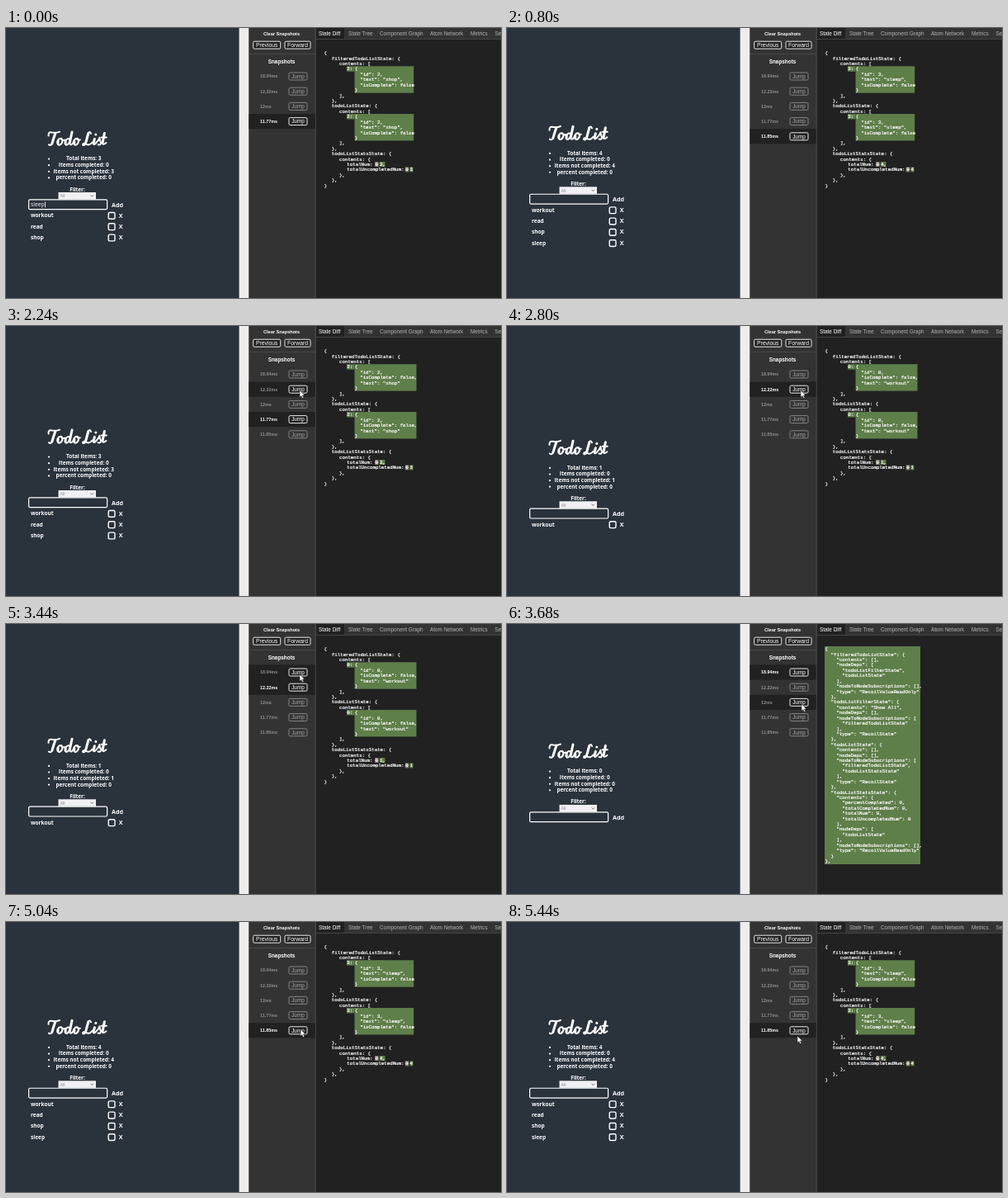
An HTML page that plays this animation: 600x327 px, repeating every 5.52 s.

```html
<!DOCTYPE html>
<html lang="en">
<head>
<meta charset="utf-8">
<title>Todo list with state snapshots</title>
<style>
html, body { margin: 0; width: 100%; height: 100%; overflow: hidden; background: #2a323b; }
svg { display: block; width: 600px; height: 327px; }
text { white-space: pre; }
.ui { font-family: "Liberation Sans", Arial, sans-serif; }
.app { font-family: "Open Sans", "Noto Sans", sans-serif; font-weight: 700; }
.code { font-family: "Liberation Mono", "Courier New", monospace; stroke: #fff; stroke-width: .22; }
.bold { font-weight: 700; }
.plain { font-weight: 500; }
.mid { text-anchor: middle; }
.script { fill: none; stroke: #fff; stroke-width: 2; stroke-linecap: round; stroke-linejoin: round; }
.stem { stroke-width: 3; }
</style>
</head>
<body>
<svg viewBox="0 0 600 327">
  <rect width="600" height="327" fill="#2a323b"/>
  <g id="app"></g>
  <rect x="282.6" width="12" height="327" fill="#efecec"/>
  <rect x="294.4" width="81" height="327" fill="#333"/>
  <rect x="375" width="225" height="327" fill="#212121"/>
  <g id="head"></g>
  <g id="side"></g>
  <g id="diff"></g>
  <path id="mouse" d="M0 0V8.2L1.9 6.5 3.2 9.4 4.7 8.7 3.4 5.9H6Z" fill="#fff" stroke="#222" stroke-width=".5"/>
</svg>
<script>
const LOOP = 5520, TICK = 80;
const GREEN = '#5f7f4a', DARK = '#212121';
const todos = ['workout', 'read', 'shop', 'sleep'];
const times = ['18.94ms', '12.22ms', '12ms', '11.77ms', '11.85ms'];
const el = id => document.getElementById(id);

// [start, item count, typed text]; the active snapshot equals the item count
const states = [
  [0, 3, 'sleep'], [720, 4], [1840, 3], [2400, 1],
  [3520, 0], [4080, 2], [4240, 3], [4960, 4]
];

// [time, x, y] of the pointer tip
const path = [
  [960, 300, 190], [1200, 391, 134], [1360, 391, 134], [1600, 357, 114],
  [1920, 357, 114], [2160, 356, 78], [2960, 356, 78], [3200, 356, 61],
  [3520, 356, 61], [3660, 357, 97], [4080, 357, 97], [4180, 357, 114],
  [4240, 357, 115], [4320, 357, 122], [4480, 357, 130], [5040, 357, 130],
  [5200, 352, 138], [LOOP, 352, 138]
];

// y is the middle of the line
const text = (x, y, s, cls, size, fill = '#fff') =>
  `<text x="${x}" y="${y + size * .35}" class="${cls}" font-size="${size}" fill="${fill}">${s}</text>`;
const rect = (x, y, w, h, fill) =>
  `<rect x="${x}" y="${y}" width="${w}" height="${h}" fill="${fill}"/>`;
const frame = (x, y, w, h, width, stroke = '#fff', fill = 'none') =>
  `<rect x="${x}" y="${y}" width="${w}" height="${h}" rx="1.5" fill="${fill}" stroke="${stroke}" stroke-width="${width}"/>`;

const button = (x, y, w, label, size, lit = true) =>
  frame(x, y, w, 9, .9, lit ? '#fff' : '#8e8e8e', lit ? DARK : 'none') +
  text(x + w / 2, y + 4.6, label, 'ui mid', size, lit ? '#fff' : '#a6a6a6');

const title = `<g class="script" role="img" aria-label="Todo List">
  <path d="M51.5 130.5Q51 126 55 126.4Q60 127.6 65 125.6M55.8 140Q54.5 143 51.8 141.2"/>
  <path d="M66.5 133.8Q63 133.8 62.4 138.5Q62.4 142 65.2 141.6Q68.2 140.5 68.4 136.5Q68 134 66.5 133.8Q68 137 71.5 135.6"/>
  <path d="M77.6 135Q75 132.6 72.6 136.2Q70.8 140.2 73 141.7Q75.6 141.8 77.2 137M77.2 138.5Q77 142 79.6 141Q81 140 82 137.5"/>
  <path d="M86 133.8Q82.8 133.8 82 138.5Q82 142 84.8 141.6Q87.8 140.5 88 136.5Q87.6 134 86 133.8Q87 136.6 89.8 135.4"/>
  <path d="M103 128Q101.6 124.4 99.8 127.5L96.8 138.5Q95.8 143 93.2 141.8Q92.6 139.2 96.3 140Q101 143.4 104.4 138.5"/>
  <path d="M105.9 139.6Q106 142.8 109.4 139Q112.6 136 113.4 132.8Q113.6 136 115 138.6Q115.2 142.2 111.6 141.2"/>
  <path d="M117 138.8Q117 142.8 121.4 139M115.6 132.4H121.8"/>
  <path class="stem" d="M59.8 127.5Q57.5 134 55.8 140M63 137L62.9 139.5M72.2 137.5L72 140M80 126L77.3 138.5M82.8 137L82.7 139.5M99.8 127.5L96.8 138.5M107.4 134.4L106 139.6M108.8 129v.1M119.4 127.4L117.1 138.8"/>
</g>`;

function drawApp(count, typed, caret) {
  const stats = [`Total items: ${count}`, 'Items completed: 0', `Items not completed: ${count}`, 'percent completed: 0'];
  let s = title;
  stats.forEach((label, i) => {
    const y = 158.2 + i * 7.6;
    s += `<circle cx="52" cy="${y + .4}" r="1.1" fill="#fff"/>` + text(94.2, y, label, 'app mid', 6.4);
  });
  s += text(86.5, 195.3, 'Filter:', 'app mid', 6.4);
  s += rect(63.5, 199, 45.5, 8.5, '#f1f1f5') + text(65.5, 203.4, 'All', 'ui', 5.4, '#8d9096');
  s += '<path d="M102.6 202.4l1.7 1.8 1.7-1.8" fill="none" stroke="#555" stroke-width=".8"/>';
  s += frame(27.6, 207.9, 95, 11.8, 1.2);
  if (typed) s += text(30, 213.9, typed, 'app plain', 6.7);
  if (caret) s += rect(47.2, 210.4, .8, 7, '#fff');
  s += text(128, 214.1, 'Add', 'app', 7.2);
  todos.slice(0, count).forEach((todo, i) => {
    const y = 227 + i * 13.3;
    s += text(30, y, todo, 'app', 6.5) + frame(124.2, y - 3.5, 7.8, 7.8, 1.4) + text(136.8, y, 'X', 'app', 7.2);
  });
  el('app').innerHTML = s;
  el('app').setAttribute('transform', `translate(0 ${(3 - count) * 6.65})`);
}

function drawHead() {
  const tabs = [[415, 'State Tree'], [453, 'Component Graph'], [514, 'Atom Network'], [563, 'Metrics'], [592.5, 'Settings']];
  let s = rect(375, 0, 225, 13, '#333') + rect(375, 13, 225, 1, '#444') + rect(376, 0, 34, 13, DARK);
  s += text(379, 6.6, 'State Diff', 'ui', 6.4);
  for (const [x, label] of tabs) s += text(x, 6.6, label, 'ui', 6.4, '#b4b4b4');
  s += text(334, 7, 'Clear Snapshots', 'ui bold mid', 5.6);
  s += button(299.7, 16.2, 33, 'Previous', 6.8) + button(338, 16.2, 31, 'Forward', 6.8);
  s += rect(295, 31, 80, 1, '#484848') + rect(374.6, 0, 1, 327, '#505050');
  s += text(334, 41.2, 'Snapshots', 'ui bold mid', 6.4);
  el('head').innerHTML = s;
}

function drawSide(shown, active, hover) {
  el('side').innerHTML = times.slice(0, shown).map((time, i) => {
    const y = 58.5 + i * 18.2, on = i === active, lit = on || i === hover;
    return (lit ? rect(294.4, y - 9.1, 80.2, 18.2, DARK) : '') +
      text(308, y, time, 'ui bold', 5.4, on ? '#fff' : '#8f8f8f') +
      button(343, y - 4.5, 22, 'Jump', 6.4, lit);
  }).join('');
}

const rowY = i => 30.2 + i * 6.42;
const code = (x, row, s) => text(x, rowY(row), s, 'code', 5.77);

// Initial tree, one nesting level per two spaces
function drawTree() {
  const list = (key, names) => names.length
    ? [`    "${key}": [`, ...names.map((n, i) => `      "${n}"${i < names.length - 1 ? ',' : ''}`), '    ],']
    : [`    "${key}": [],`];
  const node = (name, contents, deps, subs, type) => [
    `  "${name}": {`, ...contents, ...list('nodeDeps', deps),
    ...list('nodeToNodeSubscriptions', subs), `    "type": "${type}"`
  ];
  const empty = ['    "contents": [],'];
  const totals = ['percentCompleted', 'totalCompletedNum', 'totalNum', 'totalUncompletedNum']
    .map((k, i) => `      "${k}": 0${i < 3 ? ',' : ''}`);
  const rows = ['{',
    ...node('filteredTodoListState', empty, ['todoListFilterState', 'todoListState'], [], 'RecoilValueReadOnly'), '  },',
    ...node('todoListFilterState', ['    "contents": "Show All",'], [], ['filteredTodoListState'], 'RecoilState'), '  },',
    ...node('todoListState', empty, [], ['filteredTodoListState', 'todoListStatsState'], 'RecoilState'), '  },',
    ...node('todoListStatsState', ['    "contents": {', ...totals, '    },'], ['todoListState'], [], 'RecoilValueReadOnly'),
    '  }', '},'];
  return rect(385, 27, 116, 264, GREEN) + rows.map((row, i) => code(385.6, i, row)).join('');
}

function drawChange(count, textFirst) {
  const id = count - 1, name = todos[id];
  const fields = textFirst
    ? [`"id": ${id},`, `"text": "${name}",`, '"isComplete": false']
    : [`"id": ${id},`, '"isComplete": false,', `"text": "${name}"`];
  const x = [385.5, 394.8, 404, 413.3, 422.8, 429.2];
  const list = (row, key) => {
    const y = rowY(row + 2) - 3.2;
    return code(x[1], row, key + ': {') + code(x[2], row + 1, 'contents: [') +
      rect(413, y, 9.5, 6.4, GREEN) + rect(422.5, y, textFirst ? 71.7 : 75, 32.4, GREEN) +
      code(x[3], row + 2, id + ':') + code(x[4], row + 2, '{') +
      fields.map((f, i) => code(x[5], row + 3 + i, f)).join('') +
      code(x[4], row + 6, '}') + code(x[2], row + 7, '],') + code(x[1], row + 8, '},');
  };
  const total = (row, key, left, end) => {
    const y = rowY(row) - 3;
    return code(x[3], row, key + ':') +
      rect(left, y, 4.4, 6, '#857c6e') + code(left + .4, row, '0') + rect(left, y + 2.8, 4.4, .6, '#ddd') +
      rect(left + 5.6, y, 4 + end.length * 2.6, 6, GREEN) + code(left + 5.8, row, count + end);
  };
  return code(x[0], 0, '{') + list(1, 'filteredTodoListState') + list(10, 'todoListState') +
    code(x[1], 19, 'todoListStatsState: {') + code(x[2], 20, 'contents: {') +
    total(21, 'totalNum', 447.2, ',') + total(22, 'totalUncompletedNum', 483.8, '') +
    code(x[2], 23, '},') + code(x[1], 24, '},') + code(x[0], 25, '}');
}

function pointer(t) {
  const i = path.findIndex(p => p[0] > t);
  if (i < 1) return null;
  const [t0, x0, y0] = path[i - 1], [t1, x1, y1] = path[i];
  const u = (t - t0) / (t1 - t0), e = u * u * (3 - 2 * u);
  return [x0 + (x1 - x0) * e, y0 + (y1 - y0) * e];
}

const last = {};
function update(key, value, draw) {
  if (last[key] === value) return;
  last[key] = value;
  draw();
}

function render(now) {
  const t = Math.floor((now % LOOP) / TICK) * TICK;
  const [start, count, typed] = states.filter(s => s[0] <= t).pop();
  const caret = t < 240;
  const shown = start ? 5 : 4;
  const textFirst = count === 4 || start === 0;
  const tip = pointer(t);
  const inside = tip && tip[0] > 295 && tip[0] < 375;
  const hover = inside ? Math.floor((tip[1] - 49.4) / 18.2) : -1;
  update('app', `${start} ${caret}`, () => drawApp(count, typed, caret));
  update('side', `${shown} ${count} ${hover}`, () => drawSide(shown, count, hover));
  update('diff', start, () => {
    el('diff').innerHTML = count ? drawChange(count, textFirst) : drawTree();
  });
  el('mouse').style.display = tip ? '' : 'none';
  if (tip) el('mouse').setAttribute('transform', `translate(${tip})`);
}

const begin = performance.now();
function loop() {
  render(performance.now() - begin);
  requestAnimationFrame(loop);
}
drawHead();
loop();
</script>
</body>
</html>
```
